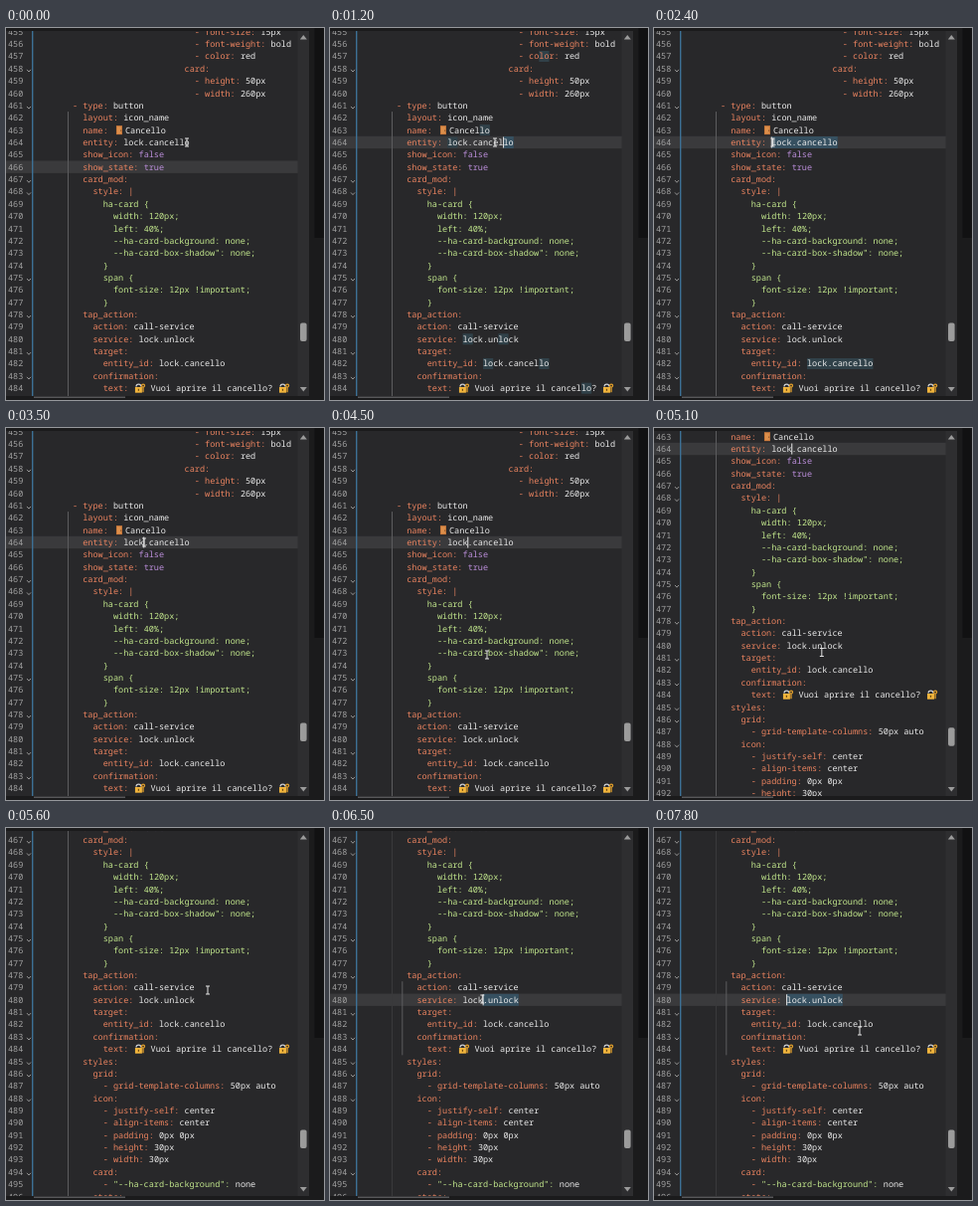
These frames come from a looping animation (320 px wide and 374 px high, 8 s). An HTML page with a canvas:

```html
<!DOCTYPE html>
<html lang="it">
<head>
<meta charset="utf-8">
<title>YAML editor</title>
<style>
  html, body { margin: 0; width: 100%; height: 100%; overflow: hidden; background: #1b1b1c; }
  canvas { display: block; width: 320px; height: 374px; }
</style>
</head>
<body>
<canvas id="stage"></canvas>
<script>
const W = 320, H = 374, LOOP = 8000, STEP = 100;
const FIRST = 455, ROW = 12.36, CHAR = 5.118, LEFT = 67, ICON = 12;
const TOP = 3, BOTTOM = 370;
const FONT = '8.53px "Noto Sans Mono", "DejaVu Sans Mono", monospace';
const COLOR = {
  bg: '#28282a', active: '#3a3a3c', number: '#a2a2a2', key: '#ec8460',
  value: '#ececec', bool: '#bd8fdc', block: '#c3e88d',
  select: '#365060', match: '#304149', guide: '#5c5c5e', faint: '#39393b'
};

// "#" stands for the door icon, "@" for the padlock icon
const pad = ' '.repeat(22);
const lines = [
  pad + '  - font-size: 15px',
  pad + '  - font-weight: bold',
  pad + '  - color: red',
  pad + 'card:',
  pad + '  - height: 50px',
  pad + '  - width: 260px',
  '- type: button',
  '  layout: icon_name',
  '  name: #Cancello',
  '  entity: lock.cancello',
  '  show_icon: false',
  '  show_state: true',
  '  card_mod:',
  '    style: |',
  '      ha-card {',
  '        width: 120px;',
  '        left: 40%;',
  '        --ha-card-background: none;',
  '        --ha-card-box-shadow": none;',
  '      }',
  '      span {',
  '        font-size: 12px !important;',
  '      }',
  '  tap_action:',
  '    action: call-service',
  '    service: lock.unlock',
  '    target:',
  '      entity_id: lock.cancello',
  '    confirmation:',
  '      text: @ Vuoi aprire il cancello? @',
  '  styles:',
  '    grid:',
  '      - grid-template-columns: 50px auto',
  '    icon:',
  '      - justify-self: center',
  '      - align-items: center',
  '      - padding: 0px 0px',
  '      - height: 30px',
  '      - width: 30px',
  '    card:',
  '      - "--ha-card-background": none',
  '    state:'
];
const folds = new Set([458, 461, 467, 468, 475, 478, 481, 483, 485, 486, 488, 494, 496]);

const mouseTrack = [
  [0, 182, 115], [900, 184, 115], [1200, 166, 115], [1900, 119, 115], [2800, 120, 115],
  [3100, 107, 115], [3500, 139, 115], [3800, 141, 118], [4400, 158, 228], [4500, 158, 228],
  [4700, 160, 237], [5000, 162, 238], [5600, 203, 163], [6100, 190, 172], [6700, 135, 172],
  [7100, 135, 172], [7200, 137, 172], [7300, 137, 172], [7800, 207, 204], [LOOP, 207, 204]
];
const scrollTrack = [
  [0, 0], [4500, 0], [4600, 24], [4700, 60], [4800, 68], [4900, 70],
  [5000, 70], [5100, 94], [5200, 128], [5300, 138], [5400, 140], [LOOP, 140]
];
const dragOne = [[0, 13], [1000, 13], [1200, 11], [1800, 0], [LOOP, 0]];
const dragTwo = [[0, 11], [6100, 11], [6700, 0], [LOOP, 0]];

const canvas = document.getElementById('stage');
const ctx = canvas.getContext('2d');
const ratio = window.devicePixelRatio || 1;
canvas.width = W * ratio;
canvas.height = H * ratio;

function sample(track, t, i = 1) {
  let k = 1;
  while (k < track.length - 1 && track[k][0] <= t) k++;
  const a = track[k - 1], b = track[k];
  const p = Math.min(1, (t - a[0]) / (b[0] - a[0]));
  return a[i] + (b[i] - a[i]) * p;
}

function rect(x, y, w, h, color) {
  ctx.fillStyle = color;
  ctx.fillRect(x, y, w, h);
}

function textX(text, index) {
  let x = LEFT;
  for (let i = 0; i < index; i++) x += '@#'.includes(text[i]) ? ICON : CHAR;
  return x;
}

function door(x, y) {
  rect(x + 3, y - 4.5, 6, 9, '#c9793c');
  rect(x + 4, y - 3.5, 4, 7, '#dc8f4b');
  rect(x + 7.2, y, 1, 1, '#6e3c1c');
}

function padlock(x, y) {
  ctx.strokeStyle = '#c9ccd0';
  ctx.lineWidth = 1.3;
  ctx.beginPath();
  ctx.arc(x + 5, y - 1.6, 2.4, Math.PI, 0);
  ctx.stroke();
  rect(x + 1.5, y - 1.2, 7, 5.7, '#f0b43c');
  rect(x + 4.4, y + 0.6, 1.2, 2, '#6b4a12');
  ctx.strokeStyle = '#e2a02c';
  ctx.beginPath();
  ctx.arc(x + 9.6, y - 2.6, 1.5, 0, 7);
  ctx.moveTo(x + 9.6, y - 1);
  ctx.lineTo(x + 9.6, y + 4);
  ctx.stroke();
}

function tokens(text, n) {
  if (n >= 469 && n <= 477) return [[text, COLOR.block]];
  const [, lead, key, value] = text.match(/^(\s*(?:- )?)([^:]+:)(.*)$/);
  const plain = value.trim();
  const tone = plain === '|' ? COLOR.key : /^(true|false)$/.test(plain) ? COLOR.bool : COLOR.value;
  return [[lead, COLOR.key], [key, key[0] === '"' ? COLOR.block : COLOR.key], [value, tone]];
}

function drawLine(text, n, y) {
  let at = 0;
  for (const [part, color] of tokens(text, n)) {
    for (const piece of part.split(/([@#]|\s+)/)) {
      const x = textX(text, at);
      if (piece === '#') door(x, y);
      else if (piece === '@') padlock(x, y);
      else if (piece.trim()) {
        ctx.fillStyle = color;
        ctx.fillText(piece, x, y + 3);
      }
      at += piece.length;
    }
  }
}

function drawNumber(n, y) {
  ctx.fillStyle = COLOR.number;
  ctx.fillText(n, 2, y + 3);
  if (!folds.has(n)) return;
  ctx.strokeStyle = COLOR.number;
  ctx.lineWidth = 0.9;
  ctx.beginPath();
  ctx.moveTo(21, y + 1);
  ctx.lineTo(23, y + 3.2);
  ctx.lineTo(25, y + 1);
  ctx.stroke();
}

// Active line with the selected columns of its value
function selection(t) {
  if (t < 1000) return { line: 466 };
  if (t < 3500) return { line: 464, head: Math.round(sample(dragOne, t)), tail: 13 };
  if (t < 6100) return { line: 464, head: 4, tail: 4 };
  return { line: 480, head: Math.round(sample(dragTwo, t)), tail: 11 };
}

function drawSelection(sel, rowY) {
  const text = lines[sel.line - FIRST];
  const start = text.indexOf(': ') + 2;
  const word = text.slice(start + sel.head, start + sel.tail);
  if (word.length > 1) {
    lines.forEach((s, i) => {
      for (let p = s.indexOf(word); p >= 0; p = s.indexOf(word, p + 1)) {
        rect(textX(s, p), rowY(FIRST + i) - 5.5, word.length * CHAR, 11, COLOR.match);
      }
    });
  }
  const x = textX(text, start + sel.head), y = rowY(sel.line);
  rect(x, y - 6, word.length * CHAR, 12, COLOR.select);
  return [x, y];
}

function drawScrollbar(scroll) {
  rect(293.5, TOP, 11.5, BOTTOM - TOP, '#2e2e30');
  ctx.fillStyle = '#9b9b9b';
  for (const [y, d] of [[9.5, -1], [363, 1]]) {
    ctx.beginPath();
    ctx.moveTo(295.8, y - 2 * d);
    ctx.lineTo(302.8, y - 2 * d);
    ctx.lineTo(299.3, y + 2.5 * d);
    ctx.fill();
  }
  ctx.beginPath();
  ctx.roundRect(296, 296.5 + scroll * 0.05, 6.6, 18.5, 2);
  ctx.fill();
}

function drawMouse(x, y) {
  ctx.strokeStyle = '#e4e4e4';
  ctx.lineWidth = 1;
  ctx.beginPath();
  ctx.moveTo(x, y - 4);
  ctx.lineTo(x, y + 4);
  for (const d of [-4, 4]) {
    ctx.moveTo(x - 2, y + d);
    ctx.lineTo(x + 2, y + d);
  }
  ctx.stroke();
}

function draw(t) {
  const scroll = sample(scrollTrack, t);
  const rowY = n => 115 + (n - 464) * ROW - scroll;
  const sel = selection(t);

  ctx.setTransform(ratio, 0, 0, ratio, 0, 0);
  ctx.font = FONT;
  ctx.textRendering = 'geometricPrecision';
  rect(0, 0, W, H, '#1b1b1c');
  rect(310.5, 0, 9.5, 211, '#111112');

  ctx.save();
  ctx.beginPath();
  ctx.rect(0, TOP, 305, BOTTOM - TOP);
  ctx.clip();
  rect(0, TOP, 305, BOTTOM - TOP, COLOR.bg);
  rect(0, rowY(sel.line) - 6.2, 294, ROW, COLOR.active);

  const inner = sel.line === 480;
  rect(62, rowY(462) - 6.2, 1, 520, inner ? COLOR.faint : COLOR.guide);
  if (inner) rect(72.3, rowY(479) - 6.2, 1, 6 * ROW, COLOR.guide);
  rect(26, TOP, 1.4, BOTTOM - TOP, '#3d7095');

  const caret = 'head' in sel && drawSelection(sel, rowY);
  lines.forEach((text, i) => {
    const n = FIRST + i, y = rowY(n);
    if (y < -6 || y > H + 6) return;
    drawNumber(n, y);
    drawLine(text, n, y);
  });
  if (caret) rect(caret[0] - 0.4, caret[1] - 5.5, 1, 11, '#e8e8e8');
  drawScrollbar(scroll);
  ctx.restore();

  rect(28, 370.5, 92, 1.5, '#58585a');
  drawMouse(sample(mouseTrack, t, 1), sample(mouseTrack, t, 2));
}

function tick(now) {
  draw(Math.floor((now % LOOP) / STEP) * STEP);
  requestAnimationFrame(tick);
}
requestAnimationFrame(tick);
</script>
</body>
</html>
```
